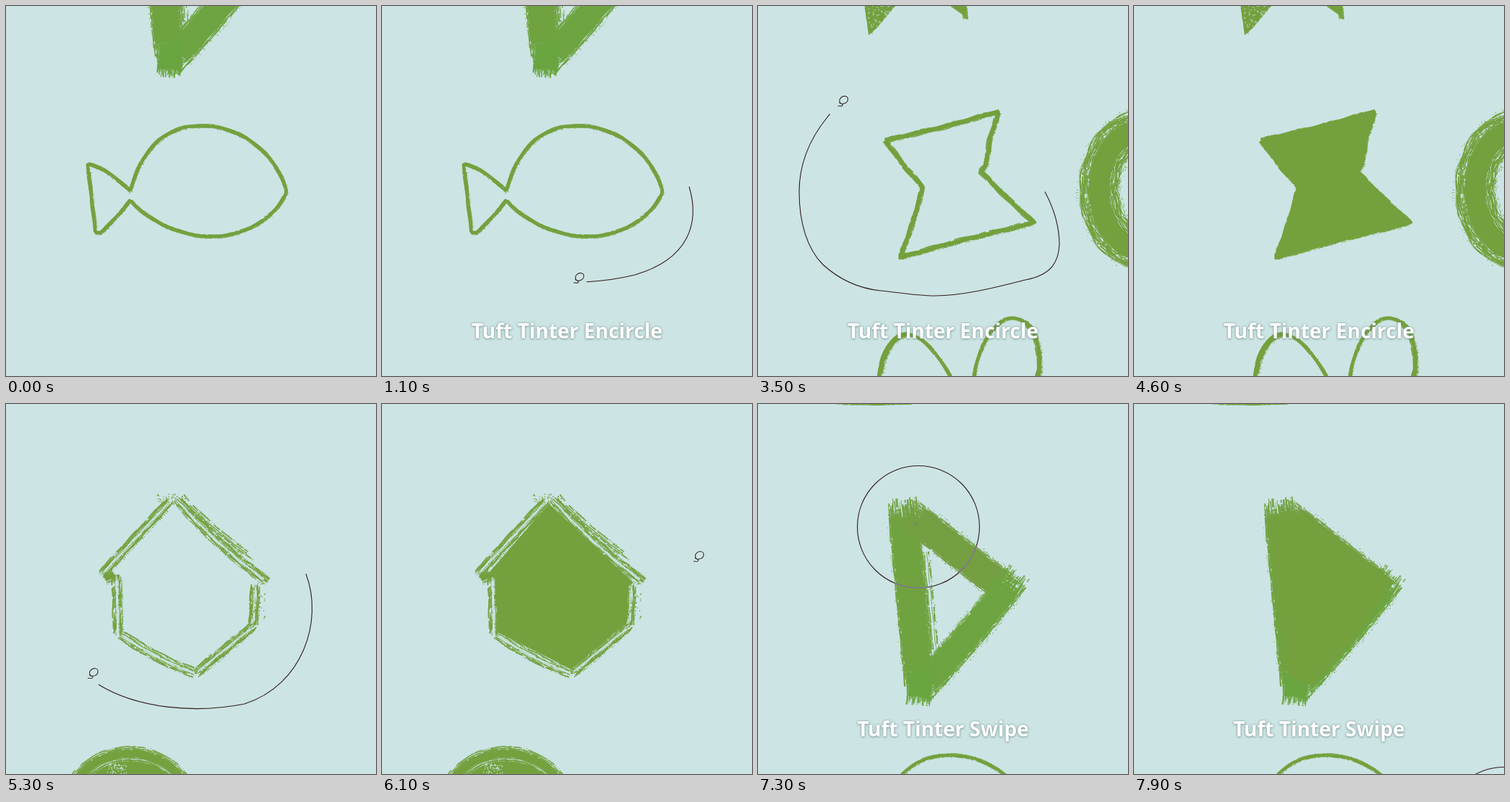
An HTML page with a canvas for the animation above (8 s loop, 512 px wide and 512 px high).

```html
<!DOCTYPE html>
<html lang="en">
<head>
<meta charset="utf-8">
<title>Lasso fill</title>
<style>
  html, body { margin: 0; width: 100%; height: 100%; overflow: hidden; background: #cce4e4; }
  canvas { position: absolute; left: 0; top: 0; width: 512px; height: 512px; }
  .caption {
    position: absolute; left: 0; top: 435px; width: 512px; opacity: 0;
    font: bold 28px/28px "Open Sans", "Noto Sans", sans-serif;
    text-align: center; white-space: nowrap; color: #fff;
    text-shadow: 0 0 3px rgba(95, 125, 120, .6), 0 1px 3px rgba(95, 125, 120, .5);
  }
</style>
</head>
<body>
<canvas id="stage" width="512" height="512"></canvas>
<div class="caption" id="lassoCaption">Tuft Tinter Encircle</div>
<div class="caption" id="brushCaption">Tuft Tinter Swipe</div>
<script>
const LOOP = 8000, STEP = 100, PAPER = '#cce4e4', GREEN = '#74a13e';
const HOURGLASS_Y = 710, HOUSE_Y = 1400, TRIANGLE_Y = 2070;

let seed = 41;
function rnd() {
  seed = (seed + 0x6D2B79F5) | 0;
  let v = Math.imul(seed ^ (seed >>> 15), 1 | seed);
  v = (v + Math.imul(v ^ (v >>> 7), 61 | v)) ^ v;
  return ((v ^ (v >>> 14)) >>> 0) / 4294967296;
}

function makePath(d) {
  const p = document.createElementNS('http://www.w3.org/2000/svg', 'path');
  p.setAttribute('d', d);
  return p;
}

// Points along a path with their unit normals
function trace(d, gap = 3) {
  const p = makePath(d), len = p.getTotalLength(), n = Math.ceil(len / gap), pts = [];
  for (let i = 0; i <= n; i++) {
    const s = len * i / n;
    const a = p.getPointAtLength(Math.max(0, s - 1)), b = p.getPointAtLength(Math.min(len, s + 1));
    const c = p.getPointAtLength(s), h = Math.hypot(b.x - a.x, b.y - a.y) || 1;
    pts.push({ x: c.x, y: c.y, nx: (a.y - b.y) / h, ny: (b.x - a.x) / h });
  }
  return pts;
}

const world = document.createElement('canvas');
world.width = 512;
world.height = TRIANGLE_Y + 720;
const pen = world.getContext('2d');

function line(pts, offset, wobble) {
  const phase = rnd() * 6;
  pen.beginPath();
  pts.forEach((p, i) => {
    const o = offset + wobble * Math.sin(phase + i * .45);
    pen.lineTo(p.x + p.nx * o, p.y + p.ny * o);
  });
  pen.stroke();
}

// A chalk stroke: solid core, dry bristles and loose grains at the rim; `ends` frays the tips
function chalk(d, { w = 5, n = 12, dry = .4, core = .6, color = GREEN, wobble = .4, ends = 0 } = {}) {
  const pts = trace(d);
  pen.strokeStyle = pen.fillStyle = color;
  pen.lineJoin = 'round';
  if (core) {
    pen.lineWidth = w * core;
    pen.setLineDash([]);
    line(pts.slice(ends, pts.length - ends), 0, wobble / 2);
  }
  for (let i = 0; i < n; i++) {
    const side = 2 * ((i + rnd()) / n) - 1;
    const gap = dry * (.3 + .7 * side * side);
    const skip = Math.floor(rnd() * ends), cut = Math.floor(rnd() * ends);
    pen.lineWidth = .7 + rnd() * 1.3;
    pen.setLineDash([6 + rnd() * 55 * (1 - gap * .7), .5 + gap * rnd() * 14, 3 + rnd() * 14, gap * rnd() * 6]);
    pen.lineDashOffset = rnd() * 60;
    line(pts.slice(skip, pts.length - cut), side * w / 2, wobble);
  }
  for (const p of pts.slice(ends, pts.length - ends)) {
    for (let k = 0; k < 3; k++) {
      const o = (rnd() < .5 ? -1 : 1) * (w / 2) * (.85 + rnd() * .3), size = .5 + rnd() * .9;
      pen.fillRect(p.x + p.nx * o, p.y + p.ny * o, size, size);
    }
  }
  pen.setLineDash([]);
}

function specks(color, n, x, y, w, h) {
  pen.fillStyle = color;
  for (let i = 0; i < n; i++) pen.fillRect(x + rnd() * w, y + rnd() * h, 1.2, 1.4);
}

function at(x, y, draw) {
  pen.save();
  pen.translate(x, y);
  draw();
  pen.restore();
}

const FISH = 'M172 256C150 236 135 224 113 218L124 313Q128 315 133 312Q150 296 172 269' +
  'C200 300 245 319 285 319C335 318 375 290 388 257C375 205 325 166 273 166C215 164 186 205 172 256Z';
const HOURGLASS = 'M176 186L258 167L333 146L321 184L315 222L308 229L345 266L382 300L275 326' +
  'L197 348L215 297L228 251L202 221Z';
const HOUSE = 'M231 138L348 247L341 253L339 302L262 367L160 316L157 240L143 239Z';
const TRIANGLE = 'M184 162L206 148L235 153L360 245L300 330L246 388L213 378Z';

function fish() { chalk(FISH, { w: 4.4, n: 9, dry: .6, core: .65 }); }

function hourglass() {
  chalk(HOURGLASS, { w: 6, n: 12, dry: .4, core: .75, wobble: .7 });
}

function chevron() {
  pen.fillStyle = GREEN;
  pen.fill(new Path2D('M148 0L153 40L165 30L190 0L232 -120L205 -150L178 -110Z'));
  pen.fill(new Path2D('M232 -120L205 -150L245 -40L266 0L283 12L289 19L288 0Z'));
  chalk('M156 38L150 0L182 -100', { w: 5, n: 5, dry: .9, core: 0 });
  chalk('M287 18L285 0L240 -100', { w: 6, n: 6, dry: .9, core: 0 });
  specks(PAPER, 60, 152, -4, 34, 32);
}

function petals() {
  chalk('M272 630C190 590 160 540 168 505C174 470 190 453 207 454C232 458 250 485 268 515', { w: 4, n: 8 });
  chalk('M299 515C303 475 327 432 352 432C380 434 388 458 389 490C390 540 330 600 272 630', { w: 4, n: 8 });
  chalk('M169 512C173 478 188 456 207 455', { w: 7, n: 10, dry: .6, ends: 2 });
  chalk('M366 436C386 446 390 475 390 512', { w: 7, n: 10, dry: .8, ends: 2 });
}

function ring() {
  chalk('M530 172A58 82 0 0 0 530 336A58 82 0 0 0 530 172Z',
    { w: 56, n: 58, dry: .75, core: .5, wobble: 1.2 });
}

function house() {
  for (const d of ['M131 237L228 133', 'M236 132Q293 197 362 246', 'M345 250L342 306',
    'M344 306L262 373', 'M264 373Q210 355 156 317', 'M153 236L155 320']) {
    chalk(d, { w: 13, n: 13, dry: .9, core: .3, wobble: .6, ends: 3 });
    chalk(d, { w: 3, n: 3, dry: .6, core: .4, color: PAPER, wobble: .6, ends: 3 });
  }
  chalk('M242 127Q280 170 345 216', { w: 9, n: 5, dry: 1, core: 0, ends: 8 });
  chalk('M137 242L150 236', { w: 14, n: 9, dry: .8, core: .5 });
  specks(GREEN, 70, 208, 124, 40, 14);
  specks(GREEN, 50, 340, 240, 18, 58);
}

function blob() {
  pen.fillStyle = GREEN;
  pen.beginPath();
  pen.ellipse(172, 574, 82, 80, 0, 0, 7);
  pen.fill();
  chalk('M170 484A90 88 0 0 0 172 660A90 88 0 0 0 170 484Z', { w: 20, n: 18, dry: .8, core: .5 });
  specks(PAPER, 60, 140, 498, 26, 16);
  chalk('M110 668Q160 671 213 668', { w: 3, n: 4 });
}

function triangle() {
  chalk('M199 130L224 395', { w: 42, n: 44, dry: .5, core: .85, color: '#70a340', ends: 9 });
  chalk('M200 146C250 180 285 214 356 264', { w: 44, n: 44, dry: .5, core: .85, color: '#749f42', ends: 9 });
  chalk('M362 232Q300 314 218 402', { w: 42, n: 44, dry: .7, core: .8, color: '#6ea441', ends: 9 });
  chalk('M226 362L222 417', { w: 34, n: 34, dry: .3, core: .9, color: '#6aa540', ends: 4 });
  chalk('M229 205L242 340', { w: 14, n: 6, dry: 1, core: 0, color: '#70a340' });
}

at(3, -318, triangle);
fish();
at(0, HOURGLASS_Y, () => { chevron(); ring(); petals(); hourglass(); });
at(0, HOUSE_Y, () => { house(); blob(); });
at(0, TRIANGLE_Y, triangle);
at(-5, TRIANGLE_Y + 320, fish);

// Keyframes [time, ...values], eased between neighbours
function track(keys, t) {
  if (t <= keys[0][0]) return keys[0].slice(1);
  for (let i = 1; i < keys.length; i++) {
    const a = keys[i - 1], b = keys[i];
    if (t <= b[0]) {
      const u = (t - a[0]) / (b[0] - a[0]), e = u * u * (3 - 2 * u);
      return a.slice(1).map((v, k) => v + (b[k + 1] - v) * e);
    }
  }
  return keys[keys.length - 1].slice(1);
}

const SCROLL = [[2100, 0], [2700, HOURGLASS_Y], [4600, HOURGLASS_Y], [5000, HOUSE_Y],
  [6200, HOUSE_Y], [6800, TRIANGLE_Y]];
const POINTER = [[100, 405, 535], [800, 425, 250], [1800, 425, 250], [2000, 448, 311], [2200, 448, 311],
  [2800, 397, 257], [3900, 397, 257], [4100, 430, 300], [4400, 560, 540], [4700, 560, 300],
  [5000, 415, 235], [5900, 415, 235], [6100, 432, 217], [6300, 440, 214]];
const BRUSH = [[6500, 330, 600], [6900, 259, 243], [7100, 330, 246], [7300, 222, 170],
  [7500, 214, 320], [7650, 290, 370], [7900, 512, 587]];
const CAPTIONS = {
  lassoCaption: [[300, 0], [800, 1], [4600, 1], [5000, 0]],
  brushCaption: [[6400, 0], [6800, 1]]
};
const FILLS = [
  { d: FISH, y: 0, from: 1900 },
  { d: HOURGLASS, y: HOURGLASS_Y, from: 4000 },
  { d: HOUSE, y: HOUSE_Y, from: 5900 },
  { d: TRIANGLE, y: TRIANGLE_Y, from: 7600 }
].map(f => ({ ...f, shape: new Path2D(f.d) }));
const LASSOS = [
  { from: 900, to: 1800, off: 1900, d: 'M425 250C440 300 425 350 350 372C270 392 150 385 100 335' +
    'C55 285 55 190 100 150C170 95 330 90 390 160C425 200 430 230 425 250' },
  { from: 2900, to: 3850, off: 4000, d: 'M397 257C412 285 417 310 417 330C416 352 408 372 370 379' +
    'C330 389 285 401 245 401C220 401 190 396 170 394C140 391 112 378 90 358C68 336 57 300 57 257' +
    'C57 215 75 180 95 155C130 110 190 95 240 98C310 100 365 175 397 257' },
  { from: 5000, to: 5800, off: 5900, d: 'M415 235C440 300 410 390 330 415C230 435 110 410 75 330' +
    'C45 250 60 150 130 100C200 60 330 65 390 140C412 175 420 205 415 235' }
].map(l => {
  const path = makePath(l.d);
  return { ...l, path, len: path.getTotalLength(), shape: new Path2D(l.d) };
});

const view = document.getElementById('stage').getContext('2d');
const loopIcon = new Path2D('M3 -3C-1 -8 4 -13 9 -13C15 -12 14 -5 9 -3C6 -2 3 -2 1 -4' +
  'M3 -3C6 -2 7 0 4 1C2 1 1 0 -1 1');

function drawPointer(x, y) {
  view.save();
  view.translate(x, y);
  view.strokeStyle = 'rgba(255,255,255,.55)';
  view.lineWidth = 2.6;
  view.stroke(loopIcon);
  view.strokeStyle = '#333';
  view.lineWidth = 1.2;
  view.stroke(loopIcon);
  view.restore();
}

// Inverts what lies beneath the line
function invert(draw) {
  view.save();
  view.globalCompositeOperation = 'difference';
  view.strokeStyle = view.fillStyle = '#fff';
  view.lineWidth = 1.1;
  draw();
  view.restore();
}

function drawFills(t, scroll) {
  view.fillStyle = GREEN;
  for (const f of FILLS) {
    if (t < f.from) continue;
    view.save();
    view.translate(0, f.y - scroll);
    view.fill(f.shape);
    view.restore();
  }
}

function render(t) {
  const scroll = Math.round(track(SCROLL, t)[0]);
  view.fillStyle = PAPER;
  view.fillRect(0, 0, 512, 512);
  view.drawImage(world, 0, -scroll);
  drawFills(t, scroll);

  let [px, py] = track(POINTER, t);
  const lasso = LASSOS.find(l => t >= l.from && t < l.off);
  if (lasso) {
    const done = lasso.len * Math.min(1, (t - lasso.from) / (lasso.to - lasso.from));
    invert(() => {
      view.setLineDash([done, lasso.len + 10]);
      view.stroke(lasso.shape);
    });
    const tip = lasso.path.getPointAtLength(Math.min(lasso.len, done + 17));
    px = tip.x;
    py = tip.y;
  }
  if (t > 0 && t <= 6300) drawPointer(px, py);

  if (t >= 6500) {
    const [bx, by] = track(BRUSH, t);
    invert(() => {
      view.beginPath();
      view.arc(bx, by, 84.5, 0, 7);
      view.stroke();
      view.fillRect(bx - 4.5, by - 5.5, 2, 2);
    });
  }
  for (const id in CAPTIONS) {
    document.getElementById(id).style.opacity = track(CAPTIONS[id], t)[0];
  }
}

const start = performance.now();
function tick() {
  const t = (performance.now() - start) % LOOP;
  render(Math.floor(t / STEP) * STEP);
  requestAnimationFrame(tick);
}
tick();
</script>
</body>
</html>
```
